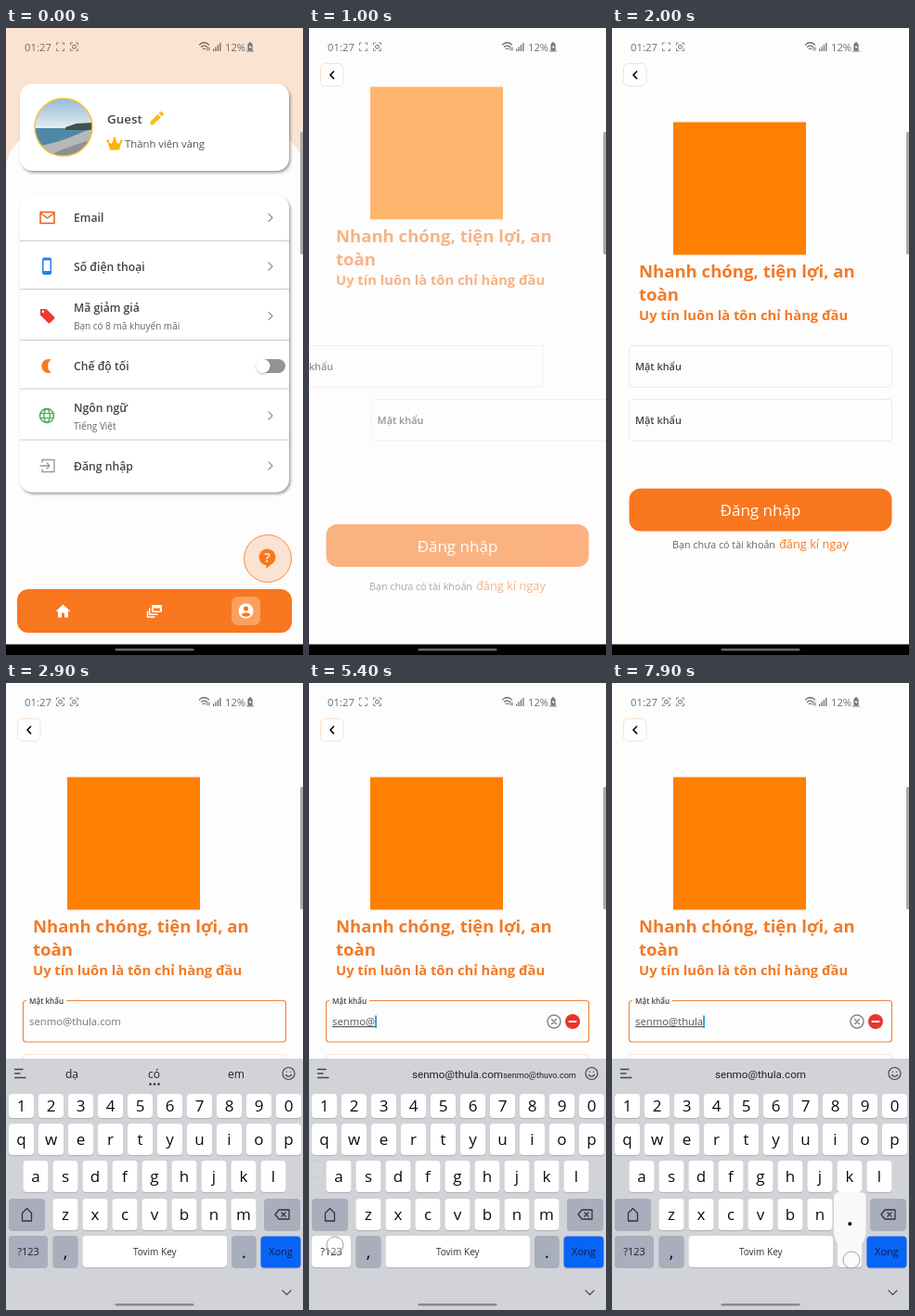
Write an HTML page that moves like this. It is 320 px wide and 676 px high and loops after 8 s.

```html
<!DOCTYPE html>
<html lang="vi">
<head>
<meta charset="utf-8">
<title>Đăng nhập</title>
<style>
html, body { margin: 0; width: 100%; height: 100%; overflow: hidden; background: #fdfdfd; }
svg { display: block; width: 320px; height: 676px; }
text { font-family: "Open Sans", "Noto Sans", sans-serif; white-space: pre; }
text.guess { font-family: Roboto, sans-serif; }
.line { fill: none; stroke-linecap: round; stroke-linejoin: round; }
</style>
</head>
<body>
<svg id="stage" viewBox="0 0 320 676">
  <defs>
    <filter id="shadow" x="-10%" y="-10%" width="120%" height="125%">
      <feDropShadow dx="1.5" dy="2" stdDeviation="1.6" flood-color="#555" flood-opacity=".6"/>
    </filter>
    <filter id="soft" x="-30%" y="-30%" width="160%" height="160%">
      <feDropShadow dx="0" dy="1" stdDeviation="1" flood-opacity=".3"/>
    </filter>
    <linearGradient id="sky" x2="0" y2="1">
      <stop stop-color="#8fb9d8"/><stop offset="1" stop-color="#e6edf0"/>
    </linearGradient>
    <clipPath id="round"><circle cx="62" cy="107" r="30.5"/></clipPath>
    <clipPath id="row"><path d="M15 444.500H305V486A14 14 0 0 1 291 500H29A14 14 0 0 1 15 486Z"/></clipPath>
  </defs>
</svg>
<script>
const ORANGE = '#f9771e', PAPER = '#fdfdfd', INK = '#444';
const LOOP = 8000;
const stage = document.getElementById('stage');

function el(parent, tag, attrs = {}, content) {
  const node = document.createElementNS('http://www.w3.org/2000/svg', tag);
  set(node, attrs);
  if (content !== undefined) node.textContent = content;
  parent.append(node);
  return node;
}
function set(node, attrs) {
  for (const name in attrs) node.setAttribute(name, attrs[name]);
}
const group = (parent, attrs) => el(parent, 'g', attrs);
const box = (parent, x, y, width, height, rx, fill, more) =>
  el(parent, 'rect', { x, y, width, height, rx, fill, ...more });
const disc = (parent, cx, cy, r, fill, more) => el(parent, 'circle', { cx, cy, r, fill, ...more });
const shape = (parent, d, fill) => el(parent, 'path', { d, fill });
const line = (parent, d, stroke, width = 1.5) =>
  el(parent, 'path', { d, stroke, 'stroke-width': width, class: 'line' });
const label = (parent, x, y, size, fill, content, more) =>
  el(parent, 'text', { x, y, 'font-size': size, fill, ...more }, content);
const BOLD = { 'font-weight': 700 }, SEMI = { 'font-weight': 600 }, MID = { 'text-anchor': 'middle' };

const clamp = v => Math.min(1, Math.max(0, v));
const span = (t, from, to) => clamp((t - from) / (to - from));
const easeCubic = v => 1 - (1 - v) ** 3;

// cubic-bezier(0, 0, .58, 1)
function easeOut(x) {
  let lo = 0, hi = 1;
  for (let i = 0; i < 24; i++) {
    const s = (lo + hi) / 2;
    if (1.74 * (1 - s) * s * s + s ** 3 < x) lo = s; else hi = s;
  }
  return 3 * (1 - lo) * lo * lo + lo ** 3;
}

// Profile page
const profile = group(stage);
box(profile, 0, 0, 320, 676, 0, '#fae3d0');
box(profile, 0, 112, 320, 600, 40, PAPER);
box(profile, 15, 60, 290, 94, 14, '#fff', { filter: 'url(#shadow)' });
box(profile, 15, 180.5, 290, 320, 14, '#fff', { filter: 'url(#shadow)' });

const photo = group(profile, { 'clip-path': 'url(#round)' });
box(photo, 30, 75, 64, 34, 0, 'url(#sky)');
shape(photo, 'M31 108H94V139H31Z', '#4f88a6');
shape(photo, 'M64 107L76 103L94 102V110H64Z', '#3d5348');
shape(photo, 'M94 109C76 112 72 121 31 128V140H94Z', '#b4b9b8');
shape(photo, 'M94 120C80 124 62 130 40 140H94Z', '#8b9194');
disc(profile, 62, 107, 31, 'none', { stroke: '#f6bd32', 'stroke-width': 1.4 });

label(profile, 109, 103, 13.4, INK, 'Guest', SEMI);
shape(profile, 'M155.500 101V104.300H158.800L166.800 96.300L163.500 93ZM164.500 92L167.800 95.300L169.600 93.500Q170.300 92.800 169.600 92L167.700 90.200Q167 89.600 166.300 90.200Z', '#fdb913');
shape(profile, 'M112 131.500L109.500 122.500L113.500 125L117 118.500L120.500 125L124.500 122.500L122 131.500Z', '#fdb400');
for (const [x, y] of [[109.800, 122], [117, 119], [124.200, 122]]) disc(profile, x, y, 1.4, '#fdb400');
label(profile, 128, 129, 11.3, '#555', 'Thành viên vàng');

for (const y of [229.500, 281.500, 336.500, 389, 444]) line(profile, `M15.500 ${y}H304.500`, '#cbcbcb', 1);
for (const [y, title] of [[209, 'Email'], [262, 'Số điện thoại'], [306, 'Mã giảm giá'],
  [369, 'Chế độ tối'], [414, 'Ngôn ngữ'], [476.500, 'Đăng nhập']]) label(profile, 73, y, 12.2, INK, title, SEMI);
label(profile, 73, 325, 10, '#666', 'Bạn có 8 mã khuyến mãi');
label(profile, 73, 433, 10, '#666', 'Tiếng Việt');
for (const y of [204.500, 257, 310.500, 418, 472]) line(profile, `M283 ${y - 4}L287 ${y}L283 ${y + 4}`, '#999', 1.4);

line(profile, 'M37 198.500H52V210.500H37ZM37 199.500L44.500 205L52 199.500', '#ea5a17', 1.5);
box(profile, 39, 247.500, 10, 18.500, 2, '#2680eb');
box(profile, 40.500, 250.500, 7, 11.500, 0, '#fff');
shape(profile, 'M37 303H43.500L52 311.500Q53 312.500 52 313.500L47.500 318Q46.500 318.800 45.500 318L37 309.500Z', '#ee3a30');
disc(profile, 39.8, 305.8, 1.2, '#fff');
shape(profile, 'M48.500 357.500A7.500 7.500 0 1 0 48.500 371.500A9 9 0 0 1 48.500 357.500Z', '#f97a1f');
disc(profile, 44, 418, 7.5, 'none', { stroke: '#3fa950', 'stroke-width': 1.4 });
el(profile, 'ellipse', { cx: 44, cy: 418, rx: 3.2, ry: 7.5, fill: 'none', stroke: '#3fa950', 'stroke-width': 1.3 });
line(profile, 'M37 415.500H51M37 420.500H51', '#3fa950', 1.2);
line(profile, 'M39 468V465.500H52V478.500H39V476M37 472H47M44 469L47 472L44 475', '#999', 1.4);
box(profile, 272, 357, 29, 15, 7.5, '#949494');
disc(profile, 277, 364.5, 7.5, '#fff', { filter: 'url(#soft)' });

const ripple = group(profile, { 'clip-path': 'url(#row)' });
const wave = disc(ripple, 230, 472, 0, '#000');

disc(profile, 282, 572, 25.5, '#fae3d0', { stroke: '#f5904a', 'stroke-width': 1 });
disc(profile, 281.5, 570.5, 9, ORANGE);
shape(profile, 'M280.500 577H287L280.500 583Z', ORANGE);
label(profile, 281.5, 575.5, 14, '#fae3d0', '?', { ...BOLD, ...MID });

box(profile, 12, 605, 296, 47, 12, ORANGE);
shape(profile, 'M61.500 621.500L53.500 629H56V635.500H60V630.500H63V635.500H67V629H69.500Z', '#fff');
box(profile, 157, 622, 11, 8, 1.2, '#fff');
box(profile, 159, 625.5, 7, 3, 0, ORANGE);
line(profile, 'M154.800 626V632.300H163M152.500 629V635H160', '#fff', 1.5);
box(profile, 243, 613, 31, 31, 7, '#fff', { opacity: .3 });
disc(profile, 258.5, 628.5, 8, '#fff');
disc(profile, 258.5, 626, 2.6, ORANGE);
shape(profile, 'M253.500 632.500Q258.500 628 263.500 632.500Q258.500 637 253.500 632.500Z', ORANGE);

// Login page
const login = group(stage);
box(login, 0, 0, 320, 676, 0, PAPER);
box(login, 12.5, 38.5, 24.500, 24, 5, '#fff', { stroke: '#fae0ca' });
line(login, 'M26.500 47L23 50.700L26.500 54.400', '#111', 1.7);

const head = group(login);
box(head, 66, 101.500, 143, 143, 0, '#ff7f00');
label(head, 29, 269, 18.55, '#f27a26', 'Nhanh chóng, tiện lợi, an', BOLD);
label(head, 29, 294, 18.55, '#f27a26', 'toàn', BOLD);
label(head, 29, 315, 14.75, '#f27a26', 'Uy tín luôn là tôn chỉ hàng đầu', BOLD);

function field(y) {
  const g = group(login);
  return { g, frame: box(g, 18.5, y, 283, 44.5, 3, PAPER, { stroke: '#fbe3d0' }) };
}
const user = field(342.5), pass = field(400.5);
const notch = box(user.g, 22, 341, 43, 4, 0, PAPER);
const caption = label(user.g, 25, 369, 10.9, INK, 'Mật khẩu', SEMI);
label(pass.g, 25, 427, 10.9, INK, 'Mật khẩu', SEMI);
const hint = label(user.g, 25, 369, 11.3, '#777', 'senmo@thula.com');
const typed = label(user.g, 25, 369, 11.3, '#555', '', { 'text-decoration': 'underline' });
const caret = box(user.g, 25, 358.500, 1.8, 13.500, 0, '#2a9fcd');
const marks = group(user.g);
disc(marks, 264, 365, 7, 'none', { stroke: '#858585', 'stroke-width': 1.5 });
line(marks, 'M261.500 362.500L266.500 367.500M266.500 362.500L261.500 367.500', '#858585', 1.5);
disc(marks, 284, 365, 8, '#e5372f');
line(marks, 'M280.500 365H287.500', '#fff', 2);

const submit = group(login), signUp = group(login);
box(submit, 18.5, 496.5, 283, 46, 12, ORANGE);
label(submit, 160, 526, 17, '#fff', 'Đăng nhập', MID);
label(signUp, 65, 561, 10.75, '#666', 'Bạn chưa có tài khoản');
label(signUp, 180, 561, 12.8, ORANGE, 'đăng kí ngay');

box(stage, 0, 664.5, 320, 12, 0, '#000');

// Keyboard
const board = group(stage);
box(board, 0, 405, 320, 271, 0, '#d1d3d8');
line(board, 'M9.500 416.500H18M9.500 421H15M9.500 425.500H21', '#444', 1.3);
disc(board, 304.5, 421, 6.5, 'none', { stroke: '#444', 'stroke-width': 1.2 });
line(board, 'M301.500 422.500Q304.500 426 307.500 422.500M302.300 419V419.300M306.700 419V419.300', '#444', 1.2);
line(board, 'M298 655L302.500 659.500L307 655', '#555', 1.3);

const words = group(board);
['dạ', 'có', 'em'].forEach((w, i) => label(words, 71 + i * 88.5, 426, 12, '#222', w, MID));
for (const x of [155.500, 160, 164.500]) disc(words, x, 432.5, 1.2, '#222');
const guess = (x, size, address) => label(board, x, 426, size, '#222', address, { ...MID, class: 'guess' });
const guess1 = guess(160, 11.7, 'senmo@thula.com');
const guess2 = guess(248.5, 9.1, 'senmo@thuvo.com');

const keys = {};
const GREY = '#a8aebb';
function key(parent, name, x, y, w, h, fill = '#fff', size = 17, ink = '#0c0c0c', text = name) {
  box(parent, x, y + 1, w, h, 4, '#aeb1b7');
  const face = box(parent, x, y, w, h, 4, fill);
  label(parent, x + w / 2, y + h / 2 + size * .36, size, ink, text, MID);
  keys[name] = { x, y, w, h, face, fill };
}
const keyRow = (parent, chars, x, y, h) =>
  [...chars].forEach((c, i) => key(parent, c, x + i * 32, y, 27, h));

const letters = group(board), symbols = group(board);
keyRow(board, '1234567890', 3, 443, 26);
keyRow(letters, 'qwertyuiop', 3, 475, 34);
keyRow(letters, 'asdfghjkl', 18.5, 515, 34);
keyRow(letters, 'zxcvbnm', 50.5, 556, 34);
keyRow(symbols, '+×÷=/_<>[]', 3, 475, 34);
keyRow(symbols, '@#$%^&*()-', 3, 515, 34);
keyRow(symbols, '\'":;!?~', 50.5, 556, 34);
key(letters, 'shift', 3, 556, 39, 34, GREY, 11, '#222', '');
line(letters, 'M17.500 580V571.500L22.500 566.500L27.500 571.500V580Z', '#333', 1.3);
key(symbols, 'more', 3, 556, 39, 34, GREY, 11, '#222', '1/2');
key(board, 'back', 278, 556, 39, 34, GREY, 11, '#222', '');
line(board, 'M290 573L294 568H305V578H294ZM297 571L301 575M301 571L297 575', '#333', 1.3);
key(letters, '?123', 3, 596, 42, 34, GREY, 11, '#222');
key(symbols, 'abc', 3, 596, 42, 34, GREY, 11, '#222', 'ABC');
key(board, ',', 50.5, 596, 27, 34, GREY, 19);
key(board, 'space', 82.5, 596, 155.5, 34, '#fff', 10, '#333', 'Tovim Key');
key(board, '.', 243, 596, 26.5, 34, GREY, 19);
key(board, 'done', 274.5, 596.5, 43, 34, '#0864f6', 11, '#0a1d52', 'Xong');

const popup = group(board);
const bubble = shape(popup, '', '#f9f9fa');
const bubbleText = label(popup, 0, 0, 23, '#111', '', { ...BOLD, ...MID });

function bubblePath({ x, y, w, h }) {
  const l = x - 4, r = x + w + 4, top = y - 47;
  return `M${l + 6} ${top}H${r - 6}Q${r} ${top} ${r} ${top + 6}V${y - 5}Q${r} ${y + 2} ${x + w} ${y + 8}` +
    `V${y + h - 4}Q${x + w} ${y + h} ${x + w - 4} ${y + h}H${x + 4}Q${x} ${y + h} ${x} ${y + h - 4}` +
    `V${y + 8}Q${l} ${y + 2} ${l} ${y - 5}V${top + 6}Q${l} ${top} ${l + 6} ${top}Z`;
}

const pill = box(stage, 117.5, 669, 85, 2.5, 1.2, '#666');

// Status bar
const GLYPH = '#6e6e6e';
label(stage, 20, 25, 11.3, GLYPH, '01:27');
const corners = x => line(stage, `M${x} 18V16H${x + 2}M${x + 6} 16H${x + 8}V18M${x + 8} 22.500V24.500H${x + 6}M${x + 2} 24.500H${x}V22.500`, GLYPH, .8);
const lens = x => box(stage, x + 2.2, 18.5, 3.6, 3.6, 1, 'none', { stroke: GLYPH });
corners(54.5); corners(69.5); lens(69.5);
const blink = lens(54.5);
line(stage, 'M208.500 18Q213.500 13.500 218.500 18M210.500 20.300Q213.500 17.800 216.500 20.300M212.300 22.500Q213.500 21.500 214.700 22.500', GLYPH, 1.2);
line(stage, 'M217 24V21M219 24V21', GLYPH, 1);
for (let i = 0; i < 4; i++) box(stage, 223 + i * 2.4, 22.5 - i * 2.2, 1.3, 2.5 + i * 2.2, 0, GLYPH);
label(stage, 236, 25, 11.2, GLYPH, '12%');
box(stage, 260.5, 16.5, 5, 8, 1, GLYPH);
box(stage, 262, 15.3, 2, 1.4, 0, GLYPH);
line(stage, 'M259.500 25H266.500', GLYPH, .9);
shape(stage, 'M263.500 17.500L261.500 21H263L262.500 23.500L264.700 20H263.200Z', '#fff');
box(stage, 317, 112, 4, 132, 1.5, '#a9a9a9');

// Touches: at, hold, x, y; key presses also carry the key name
const press = (name, at, hold = 120, x, y) => {
  const k = keys[name];
  return { name, at, hold, x: x ?? k.x + k.w / 2, y: y ?? k.y + k.h * .6 };
};
const presses = [
  press('s', 3000), press('e', 3250), press('n', 3500), press('m', 3730), press('o', 3960),
  press('?123', 4780, 120, 28, 606), press('@', 5000, 150, 8, 524), press('abc', 5340, 140, 28, 606),
  press('t', 5800), press('h', 6250), press('u', 6700), press('l', 7050), press('a', 7350),
  press('.', 7820, 300, 258, 622)
];
const touches = [{ at: 250, hold: 100, x: 230, y: 472 }, { at: 2080, hold: 100, x: 160, y: 365 }, ...presses];
const rings = touches.map(p => disc(stage, p.x, p.y, 9, '#fff',
  { 'fill-opacity': .35, stroke: '#a0a2a6', 'stroke-width': 1 }));

const show = (node, on) => node.setAttribute('visibility', on ? 'visible' : 'hidden');

function drawPages(t) {
  const grow = span(t, 270, 650);
  set(wave, { r: 20 + 220 * easeCubic(grow), opacity: grow > 0 ? .1 * (1 - span(t, 560, 760)) : 0 });

  const enter = easeCubic(span(t, 700, 940)), scale = .92 + .08 * enter;
  set(login, { opacity: enter, transform: `translate(160 338) scale(${scale}) translate(-160 -338)` });

  const run = span(t, 712, 1512), rest = 1 - easeOut(run), opacity = clamp(run / .65);
  const slide = (node, dx, dy) => set(node, { opacity, transform: `translate(${dx * rest} ${dy * rest})` });
  slide(head, 0, -80);
  slide(user.g, -102, 0);
  slide(pass.g, 102, 0);
  slide(submit, 0, 81);
  slide(signUp, 0, 94);
}

function drawField(t, value, lastEdit) {
  const focus = easeCubic(span(t, 2180, 2380));
  set(user.frame, { stroke: focus > 0 ? '#f0873c' : '#fbe3d0', 'stroke-width': 1 + .2 * focus });
  set(caption, { y: 369 - 23.5 * focus, 'font-size': 10.9 - 2.8 * focus });
  set(notch, { width: 43 * focus });
  set(hint, { opacity: value ? 0 : focus });
  typed.textContent = value;
  show(marks, value);
  show(caret, t >= 2250 && (t - lastEdit) % 1000 < 500);
  set(caret, { x: 25 + (value ? typed.getComputedTextLength() : 0) });
}

function drawBoard(t, value) {
  const up = easeCubic(span(t, 2300, 2650));
  set(board, { transform: `translate(0 ${271 * (1 - up)})` });
  set(board, { display: up > 0 ? 'inline' : 'none' });
  set(pill, { fill: up > .1 ? '#898b90' : '#666' });

  const onSymbols = t >= 4780 && t < 5340;
  set(symbols, { display: onSymbols ? 'inline' : 'none' });
  set(letters, { display: onSymbols ? 'none' : 'inline' });
  set(words, { display: value ? 'none' : 'inline' });
  set(guess1, { display: value ? 'inline' : 'none' });
  set(guess2, { display: value && value.length < 7 ? 'inline' : 'none' });

  const now = presses.find(p => t >= p.at && t < p.at + p.hold);
  const pops = now && now.name.length === 1;
  set(popup, { display: pops ? 'inline' : 'none' });
  if (pops) {
    const k = keys[now.name];
    set(bubble, { d: bubblePath(k) });
    set(bubbleText, { x: k.x + k.w / 2, y: k.y - 11, 'font-weight': now.name === '.' ? 700 : 400 });
    bubbleText.textContent = now.name;
  }
  const held = now && !pops;
  for (const name of ['?123', 'abc']) set(keys[name].face, { fill: held ? '#fff' : GREY });
}

function draw(t) {
  const done = presses.filter(p => p.name.length === 1 && t >= p.at + p.hold);
  const value = done.map(p => p.name).join('');
  const last = done[done.length - 1];
  drawPages(t);
  drawField(t, value, last ? last.at + last.hold : 2250);
  drawBoard(t, value);
  show(blink, t % 1000 >= 500);
  touches.forEach((p, i) => {
    set(rings[i], { opacity: t < p.at ? 0 : 1 - span(t, p.at + p.hold, p.at + p.hold + 300) });
  });
}

const start = performance.now();
function tick() {
  draw((performance.now() - start) % LOOP);
  requestAnimationFrame(tick);
}
tick();
</script>
</body>
</html>
```
